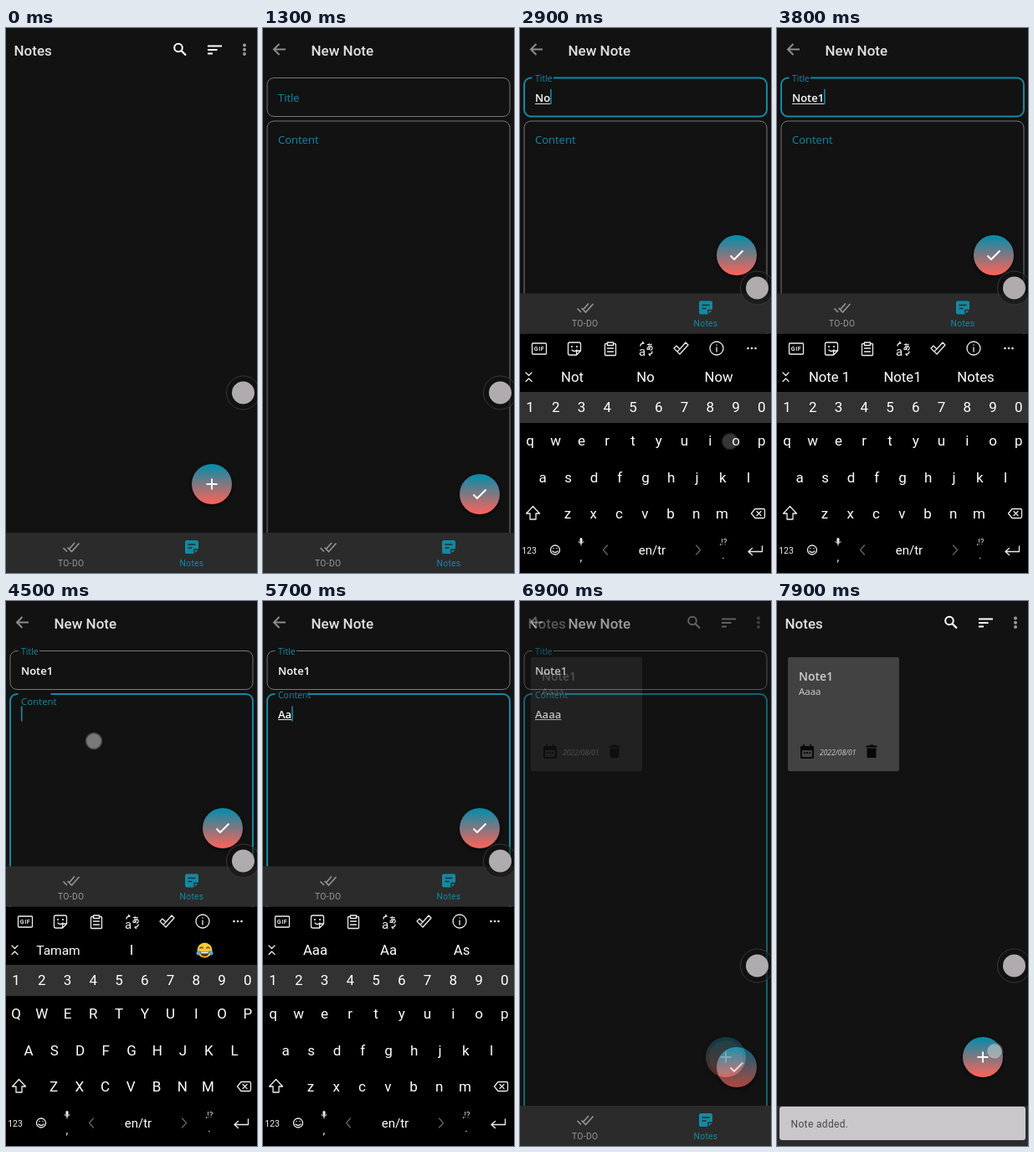
An HTML page that plays this animation: 300x650 px, repeating every 8000 ms.

```html
<!DOCTYPE html>
<html lang="en">
<head>
<meta charset="utf-8">
<title>Notes</title>
<style>
html, body { margin: 0; width: 100%; height: 100%; overflow: hidden; background: #121212; }
svg { display: block; width: 300px; height: 650px; font-family: Roboto, sans-serif; }
text { white-space: pre; }
.mid { text-anchor: middle; }
.form { font-family: "Open Sans", "Noto Sans", sans-serif; font-stretch: 75%; }
.line { fill: none; stroke: #eee; stroke-width: 1.3; stroke-linecap: round; stroke-linejoin: round; }
.shadow { filter: drop-shadow(0 2px 2px rgba(0,0,0,.6)); }
</style>
</head>
<body>
<svg id="stage" viewBox="0 0 300 650"></svg>
<script>
const LOOP = 8000, TEAL = '#1389a3';
const stage = document.getElementById('stage');
const get = id => document.getElementById(id);
const clamp = v => Math.max(0, Math.min(1, v));
const ramp = (t, a, b) => clamp((t - a) / (b - a));
const set = (id, attrs) => { for (const k in attrs) get(id).setAttribute(k, attrs[k]); };
const show = (id, on) => set(id, { display: on ? 'inline' : 'none' });
const text = (x, y, size, fill, str, extra = '') =>
  `<text x="${x}" y="${y}" font-size="${size}" fill="${fill}" ${extra}>${str}</text>`;
const line = (d, extra = '') => `<path class="line" d="${d}" ${extra}/>`;
const MID = 'class="mid"', FORM = 'class="form"';

// Keyboard rows: characters, first key x, centre y
const ROWS = [['1234567890', 12, 452], ['qwertyuiop', 12, 492], ['asdfghjkl', 27, 536], ['zxcvbnm', 57, 579]];
const STEP = 30.75;
const keyAt = c => {
  const [chars, x, y] = ROWS.find(r => r[0].includes(c.toLowerCase()));
  return [x + chars.indexOf(c.toLowerCase()) * STEP, y];
};

// Typed text: time, value, suggestions
const TITLE = [[2300, 'N', 'Ne', 'N', 'No'], [2700, 'No', 'Not', 'No', 'Now'], [3000, 'Not', 'Note', 'Not', 'Now'],
  [3200, 'Note', 'Notes', 'Note', 'Noted'], [3500, 'Note1', 'Note 1', 'Note1', 'Notes']];
const BODY = [[5100, 'A', 'And', 'A', 'As'], [5700, 'Aa', 'Aaa', 'Aa', 'As'],
  [5900, 'Aaa', 'Aaaa', 'Aaa', 'Aaaaa'], [6200, 'Aaaa', 'Aaaaaaa', 'Aaaa', 'Aaaaa']];
const FOCUS = { title: 1600, body: 4400 };

const keyTaps = [...TITLE, ...BODY].map(([t, s]) => {
  const c = s[s.length - 1], [x, y] = keyAt(c);
  const dx = c === 'o' ? -7 : 1;
  return [t, x + dx, c === 'o' ? y + 1 : y - 8, c];
});
const TAPS = [[200, 252, 540], [1500, 110, 84], ...keyTaps, [4400, 105, 167], [6500, 262, 258], [7800, 260, 537]];
const last = (list, t) => list.filter(e => e[0] <= t).pop();

function fab(id, x, y, icon) {
  return `<g id="${id}" transform="translate(${x} ${y})"><circle class="shadow" r="24" fill="url(#glow)"/>
    ${line(icon, 'style="stroke:#fff;stroke-width:2;stroke-linecap:butt"')}</g>`;
}

function calendar() {
  return `<path d="M28 174q0-1 1-1h2v-2h2v2h6v-2h2v2h2q1 0 1 1v13q0 1-1 1H29q-1 0-1-1zM30 178v8h12v-8z" fill="#080808" fill-rule="evenodd"/>
    <path d="M32 181h8" stroke="#080808" stroke-width="2" stroke-dasharray="2 1"/>`;
}

function listPage() {
  return `<g id="list">${text(9.5, 32.5, 17, '#e0e0e0', 'Notes', 'font-weight="500"')}
    <circle cx="206" cy="23.5" r="4.8" fill="none" stroke="#fff" stroke-width="2"/>
    <path d="M209.5 27l5.5 5.5" stroke="#fff" stroke-width="2.3"/>
    <path d="M241 21.5h17M241 26h11.5M241 30.5h6" stroke="#fff" stroke-width="2"/>
    <g fill="#999">${[20.5, 25.8, 31].map(y => `<circle cx="285" cy="${y}" r="2"/>`).join('')}</g>
    <g id="card"><rect x="13" y="67" width="133" height="136" rx="2" fill="#424242"/>
      ${text(26, 95, 14, '#d0d0d0', 'Note1', FORM + ' font-weight="600"')}
      ${text(26, 111.5, 11.5, '#d0d0d0', 'Aaaa', FORM)}${calendar()}
      ${text(51, 183.5, 8.5, '#ccc', '2022/08/01', FORM + ' font-style="italic"')}
      <path d="M106.5 172.5h3.5l1-1h4l1 1h3.500v2h-13zM107.500 175.500h11v10q0 1.500-1.500 1.500h-8q-1.500 0-1.500-1.500z" fill="#080808"/></g>
    ${fab('add', 246, 544, 'M-6.500 0h13M0-6.500v13')}
    <circle id="ripple" cx="246" cy="544" r="20" fill="#fff"/></g>`;
}

function field(name, y, h, gap, label) {
  return `<rect id="${name}Box" x="5" y="${y}" width="290" height="${h}" rx="8" fill="none"/>
    <rect id="${name}Gap" x="14.500" y="${y - 3}" width="${gap}" height="6" fill="#121212"/>
    ${text(18, 0, 13, TEAL, label, `id="${name}Label" ${FORM}`)}
    ${text(18, y === 59.5 ? 88 : 139.5, 13, '#fff', '', `id="${name}Text" class="form" font-weight="600"`)}
    <rect id="${name}Line" x="18" y="${y === 59.5 ? 90 : 141}" height="1" fill="#ddd"/>
    <rect id="${name}Caret" y="${y === 59.5 ? 73 : 125.5}" width="1.600" height="18" fill="${TEAL}"/>`;
}

function formPage() {
  return `<g id="form"><rect width="300" height="650" fill="#121212"/>
    <path d="M27 25.500H13.500M19.500 19l-6.500 6.500 6.500 6.500" fill="none" stroke="#8c8c8c" stroke-width="2"/>
    ${text(57.500, 32.500, 17, '#e0e0e0', 'New Note', 'font-weight="500"')}
    ${field('title', 59.5, 46, 25.5, 'Title')}${field('body', 111, 560, 39, 'Content')}
    ${fab('done', 259, 556, 'M-7.500 .5l4.500 4.500L7.500-5.500')}</g>`;
}

function navBar() {
  return `<g id="nav"><rect y="602" width="300" height="48" fill="#2b2b2b"/>
    <path d="M68.500 620l4.500 4.500M73.500 619.500l5 5 9-10M75 622l7-8" fill="none" stroke="#929292" stroke-width="1.700"/>
    ${text(77.700, 641.700, 10.300, '#979797', 'TO-DO', MID + ' letter-spacing=".3"')}
    <path d="M216 611h12q2 0 2 2v9l-5 5h-9q-2 0-2-2v-12q0-2 2-2z" fill="${TEAL}"/>
    <path d="M217.500 616h9M217.500 620h5M225 627v-5h5" fill="none" stroke="#2b2b2b" stroke-width="1.500"/>
    ${text(222, 641.700, 10.300, TEAL, 'Notes', MID + ' letter-spacing=".3"')}</g>`;
}

function toolbar() {
  return `${line('M15.500 376h15q1 0 1 1v11q0 1-1 1h-15q-1 0-1-1v-11q0-1 1-1z')}
    ${text(23, 385.200, 7, '#eee', 'GIF', MID + ' font-weight="700" letter-spacing=".6"')}
    ${line('M59.500 375h11q2 0 2 2v8l-5 5h-8q-2 0-2-2v-11q0-2 2-2zM72.500 385h-3q-2 0-2 2v3M62 384q3 3 6 0')}
    <circle cx="62" cy="380" r="1.100" fill="#eee"/><circle cx="68" cy="380" r="1.100" fill="#eee"/>
    ${line('M104.500 376.500h-2q-1 0-1 1v12q0 1 1 1h11q1 0 1-1v-12q0-1-1-1h-2M104.500 375h7v3.500h-7zM104.500 382h7M104.500 386h7')}
    ${text(146, 391, 15, '#eee', 'a', MID)}
    ${text(155, 384, 9, '#eee', 'あ', 'class="mid" style="font-family:\'Noto Sans CJK JP\',sans-serif" font-weight="700"')}
    ${line('M144 379q0-3 4-3l-1.500-1.500M158 386q0 3-4 3l1.500 1.500')}
    ${line('M184 382l3-3 4 4 7-8 3 3-10 11zM188 386l2-2')}
    <circle class="line" cx="235" cy="382" r="8"/>${line('M235 381v5M235 378v.2')}
    <g fill="#eee">${[272.5, 277, 281.5].map(x => `<circle cx="${x}" cy="382" r="1.300"/>`).join('')}</g>`;
}

function joyFace() {
  return `<g id="joy" transform="translate(237.500 416.500)"><circle r="9" fill="#fcc934"/>
    <path d="M-6-2q2.500-3 4 0M2-2q2-3 4 0" fill="none" stroke="#5f4020" stroke-width="1.300"/>
    <path d="M-5.500 1.500h11q-.5 6-5.500 6t-5.500-6z" fill="#5f3a1c"/><path d="M-4.500 2h9l-.5 1.800h-8z" fill="#fff"/>
    <path d="M-5.500 0q-5 1-4.500 4t3 1.500 1.500-5.500zM5.500 0q5 1 4.500 4t-3 1.500-1.500-5.500z" fill="#48a9e8"/></g>`;
}

function keyboard() {
  const keys = ROWS.map(([chars, x, y]) => [...chars].map((c, i) =>
    text(x + i * STEP, y + 6, 17, '#fff', c, 'class="mid key"')).join('')).join('');
  return `<g id="kbd"><rect y="365" width="300" height="285" fill="#000"/><g id="keys">
    <rect y="434" width="300" height="37" fill="#323232"/>${toolbar()}
    ${line('M7 411l3.500 3.500L14 411M7 421.500l3.500-3.500 3.500 3.500')}
    ${[62.5, 150, 237.5].map((x, i) => text(x, 422, 16.7, '#fff', '', `id="hint${i}" ${MID}`)).join('')}
    ${joyFace()}${keys}
    ${line('M15.500 570.500l8 8.500h-4.500v7h-7v-7H7.500z')}
    ${line('M281 573.500h10q1.500 0 1.500 1.500v8q0 1.500-1.500 1.500h-10l-4.500-5.500zM283 576.500l5 5M288 576.500l-5 5')}
    ${text(11, 627, 10.5, '#eee', '123', MID)}
    <circle class="line" cx="42" cy="622.500" r="5.500"/>${line('M39 624q3 3 6 0M40 620.500v.2M44 620.500v.2')}
    <rect x="71.500" y="608" width="3" height="6" rx="1.500" fill="#eee"/>${line('M70 612.500q3 5 6 0M73 615v2', 'style="stroke-width:1"')}
    ${text(73, 636, 14, '#eee', ',', MID)}
    ${line('M104.500 617l-5 5.500 5 5.500M210.500 617l5 5.500-5 5.500', 'style="stroke:#666"')}
    ${text(158, 627.500, 15, '#fff', 'en/tr', MID)}
    ${text(243, 616, 9, '#eee', ',!?', MID)}${text(243, 633, 13, '#eee', '.', MID)}
    ${line('M289.500 618v6.500h-16M277.500 620.500l-4.500 4 4.500 4')}</g></g>`;
}

stage.innerHTML = `<defs><linearGradient id="glow" x2="0" y2="1">
    <stop offset=".05" stop-color="#0c8ba8"/><stop offset=".95" stop-color="#f5645b"/></linearGradient></defs>
  <rect width="300" height="650" fill="#121212"/>
  ${listPage()}${formPage()}${navBar()}${keyboard()}
  <g id="snack"><rect x="3" y="603" width="294" height="40" rx="3" fill="#cac7ca"/>
    ${text(16.500, 627.500, 12, '#484848', 'Note added.', 'letter-spacing=".35"')}</g>
  <g id="assist"><circle r="20" fill="#121212" fill-opacity=".55" stroke="#383838"/><circle r="13.500" fill="#afabae"/></g>
  <g id="popup"><rect x="-15.500" y="-65" width="31" height="86" rx="4" fill="#fafafa"/>
    ${text(0, -36, 23, '#111', '', 'id="popChar" class="mid"')}</g>
  <circle id="touch" r="9.500" fill="#d8d8d8" stroke="#777" stroke-width="1.500"/>`;

const keyNodes = [...document.querySelectorAll('.key')];

function drawField(name, t, typed, active, rest, float) {
  const p = ramp(t, FOCUS[name], FOCUS[name] + 160);
  const entry = last(typed, t), str = entry ? entry[1] : '';
  set(name + 'Box', { stroke: active ? TEAL : '#777', 'stroke-width': active ? 2 : 1 });
  show(name + 'Gap', t >= FOCUS[name]);
  set(name + 'Label', { y: rest + (float - rest) * p, 'font-size': 13 - 2.5 * p });
  const node = get(name + 'Text');
  node.textContent = str;
  const w = str ? node.getComputedTextLength() : 0;
  show(name + 'Line', active && w > 0);
  set(name + 'Line', { width: w });
  const since = t - Math.max(FOCUS[name], entry ? entry[0] : 0);
  show(name + 'Caret', active && since % 1000 < 500);
  set(name + 'Caret', { x: 18 + w });
}

function render(time) {
  const t = Math.floor(time / 100) * 100;
  const open = t >= 1900 && t < 6800;
  const inBody = t >= FOCUS.body;
  const formAlpha = t < 3000 ? ramp(t, 400, 700) : 1 - ramp(t, 6800, 7100);

  show('form', formAlpha > 0);
  set('form', { opacity: formAlpha });
  show('list', formAlpha < 1);
  show('card', t > 4000);
  const ripple = t < 2000 ? ramp(t, 100, 300) * (1 - ramp(t, 400, 700)) : 1 - ramp(t, 7100, 7500);
  set('ripple', { opacity: 0.18 * ripple });

  drawField('title', t, TITLE, t >= FOCUS.title && !inBody, 87.5, 63.7);
  drawField('body', t, BODY, inBody, 137.5, 115.7);
  set('done', { transform: `translate(259 ${open ? 271 : 556})` });
  set('nav', { transform: `translate(0 ${open ? -285.500 : 0})` });
  const lifted = t >= 1900 && t < 6700;
  set('assist', { transform: `translate(283.500 ${lifted ? 310 : 435})` });

  show('kbd', open);
  set('keys', { transform: `translate(0 ${t < 2000 ? 60 : t < 2100 ? 4.500 : 0})` });
  const entry = last(inBody ? BODY : TITLE, t);
  const hints = entry ? entry.slice(2) : ['Tamam', 'I', ''];
  hints.forEach((h, i) => {
    get('hint' + i).textContent = h;
    set('hint' + i, { 'font-size': h === 'Tamam' ? 15.500 : h.length > 6 ? 13.600 : 16.700 });
  });
  show('joy', !entry);
  for (const k of keyNodes)
    k.textContent = entry ? k.textContent.toLowerCase() : k.textContent.toUpperCase();

  const tap = last(TAPS, t), age = tap ? t - tap[0] : 999;
  const pressed = age < 300;
  show('touch', pressed);
  show('popup', pressed && tap[3] && age < 200);
  if (pressed) {
    set('touch', { cx: tap[1], cy: tap[2], opacity: [0.85, 0.52, 0.25][age / 100] });
    if (tap[3]) {
      const [x, y] = keyAt(tap[3]);
      set('popup', { transform: `translate(${x} ${y})` });
      get('popChar').textContent = tap[3];
    }
  }

  const s = ramp(t, 7600, 7900);
  show('snack', s > 0);
  const k = 0.85 + 0.15 * s;
  set('snack', { opacity: s, transform: `translate(150 623) scale(${k}) translate(-150 -623)` });
}

const start = performance.now();
function tick() {
  render((performance.now() - start) % LOOP);
  requestAnimationFrame(tick);
}
render(0);
requestAnimationFrame(tick);
</script>
</body>
</html>
```
